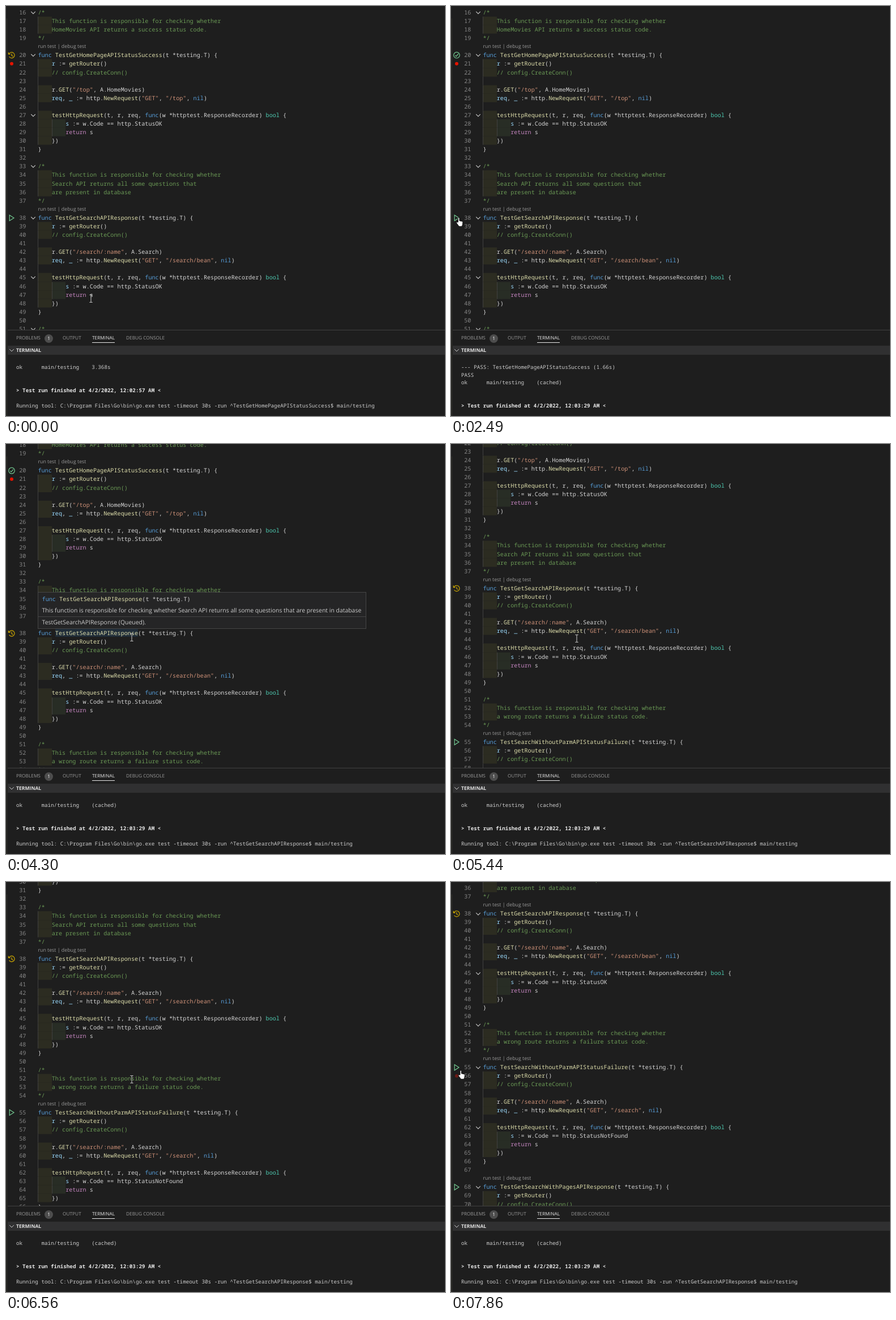
Animation of 775x723 px, one loop 8 s. Source, as an HTML page:

```html
<!DOCTYPE html>
<html lang="en">
<head>
<meta charset="utf-8">
<title>Running Go tests</title>
<style>
  html, body { margin: 0; width: 100%; height: 100%; overflow: hidden; background: #1e1e1e; }
  body { position: relative; color: #d4d4d4; white-space: pre; text-rendering: geometricPrecision;
    font: 8.3px "Open Sans", "Noto Sans", sans-serif; }
  i { font-style: normal; }
  svg { position: absolute; width: 16px; height: 16px; overflow: visible; fill: none; }
  .abs, #editor, #panel, #tip, #strip { position: absolute; }
  #editor { left: 0; top: 0; width: 775px; height: 571px; overflow: hidden; }
  #strip { width: 3px; height: 723px; background: #252522; }
  .code, .row { font: 10.165px/15.08px "Noto Sans Mono", "DejaVu Sans Mono", monospace; }
  .row { position: relative; height: 15.08px; }
  .row > * { position: absolute; top: 0; }
  .num { left: 23.2px; color: #858585; }
  .text { left: 56.4px; }
  .lens { left: 56.4px; color: #999; font: 8.8px/15.08px "Open Sans", "Noto Sans", sans-serif; }
  .indent { width: 24.4px; height: 15.2px; box-sizing: border-box; border-left: 1px solid #404040; }
  .mark { left: 2px; top: -.3px; stroke-width: 1.2; }
  .fold { left: 39.5px; top: 0; stroke: #c5c5c5; stroke-width: 1.1; }
  .dot { left: 6.8px; top: 4.3px; width: 6.6px; height: 6.6px; border-radius: 50%; background: #e51400; }
  .hint { background: #6b1a14; }
  .str { color: #ce9178; } .com { color: #6a9955; } .key { color: #569cd6; } .ret { color: #c586c0; }
  .type { color: #4ec9b0; } .fn { color: #dcdcaa; } .var { color: #9cdcfe; }
  #tip { left: 56px; top: 261px; width: 580px; height: 65px; box-sizing: border-box; background: #252526;
    border: 1px solid #454545; color: #ccc; font-size: 10.44px; line-height: 20px; }
  #tip div { padding-left: 6.6px; }
  #tip .code { line-height: 22px; }
  #tip div:last-child { border-top: 1px solid #454545; }
  #panel { left: 3px; top: 571px; width: 772px; height: 152px; background: #1e1e1e; border-top: 1px solid #414141; box-sizing: border-box; }
  .tab { top: 578px; line-height: 16px; color: #999; }
  .tab.on { color: #e7e7e7; border-bottom: 1px solid #e7e7e7; line-height: 15px; }
  #badge { left: 68px; top: 578.5px; width: 15px; height: 15px; border-radius: 50%; background: #4d4d4d;
    color: #fff; text-align: center; line-height: 15px; }
  #head { left: 3px; top: 599px; width: 772px; height: 16px; background: #303031; }
  #term { left: 18px; top: 630px; color: #ccc; font: 9.26px/13.5px "Noto Sans Mono", "DejaVu Sans Mono", monospace; }
  #term b { color: #e5e5e5; }
  #mouse { left: -8px; top: -8px; }
</style>
</head>
<body>
<div id="editor"><div id="doc"></div></div>
<div id="strip"></div>
<div id="tip"><div class="code" id="signature"></div><div>This function is responsible for checking whether Search API returns all some questions that are present in database</div><div>TestGetSearchAPIResponse (Queued).</div></div>
<div id="panel"></div>
<span class="abs tab" style="left:18px">PROBLEMS</span><span class="abs" id="badge">1</span>
<span class="abs tab" style="left:100px">OUTPUT</span>
<span class="abs tab on" style="left:152px">TERMINAL</span>
<span class="abs tab" style="left:212px">DEBUG CONSOLE</span>
<div class="abs" id="head"></div>
<svg style="left:2px;top:599px" viewBox="-8 -8 16 16"><path d="M-3.8-1.8 0 2 3.8-1.8" stroke="#ccc"/></svg>
<b class="abs" style="left:18px;top:599px;font-size:8.6px;line-height:16px;color:#e0e0e0">TERMINAL</b>
<div class="abs" id="term"></div>
<svg id="mouse" viewBox="-8 -8 16 16"></svg>
<script>
const $ = id => document.getElementById(id);

const MARKS = {
  play: '<path stroke="#73c991" d="M-3.8-5 4 0-3.8 5z"/>',
  pass: '<g stroke="#73c991"><circle r="5.3"/><path d="M-2.7.3-.8 2.2 2.8-2.2"/></g>',
  queued: '<path stroke="#cca700" d="M-4.6-2.2A5.1 5.1 0 1 1-4.4 2.6M-5.6-5V-1.8H-2.4M0-2.8V.6L2.4 2"/>'
};
const POINTERS = {
  beam: '<path stroke="#000" stroke-opacity=".5" stroke-width="2" d="M0-6V6"/><path stroke="#ddd" d="M-2.5-6.5H-.5L0-6 .5-6.5H2.5M0-6V6M-2.5 6.5H-.5L0 6 .5 6.5H2.5"/>',
  hand: '<path transform="translate(-6.5 -8.8)" fill="#fff" stroke="#000" stroke-width=".8" d="M4 9V2.2a1.2 1.2 0 0 1 2.4 0V6.5l4.6 1q1.5.4 1.4 2.2l-.6 4q-.3 2.8-2.6 2.8H6.8q-1.2 0-2-1.2L1.2 10.4q-.4-1.6 1-1.6z"/>'
};

// Document
const comment = (...lines) => ['/*', ...lines.map(l => '    ' + l), '*/'];
const test = (name, route, handler, path, status) => [
  'run test | debug test',
  `func ${name}(t *testing.T) {`,
  '    r := getRouter()',
  '    // config.CreateConn()',
  '',
  `    r.GET("${route}", A.${handler})`,
  `    req, _ := http.NewRequest("GET", "${path}", nil)`,
  '',
  '    testHttpRequest(t, r, req, func(w *httptest.ResponseRecorder) bool {',
  `        s := w.Code == http.${status}`,
  '        return s',
  '    })',
  '}',
  ''
];
const checking = 'This function is responsible for checking whether';
const source = [
  ...comment(checking, 'HomeMovies API returns a success status code.'),
  ...test('TestGetHomePageAPIStatusSuccess', '/top', 'HomeMovies', '/top', 'StatusOK'),
  ...comment(checking, 'Search API returns all some questions that', 'are present in database'),
  ...test('TestGetSearchAPIResponse', '/search/:name', 'Search', '/search/bean', 'StatusOK'),
  ...comment(checking, 'a wrong route returns a failure status code.'),
  ...test('TestSearchWithoutParmAPIStatusFailure', '/search/:name', 'Search', '/search', 'StatusNotFound'),
  ...test('TestGetSearchWithPagesAPIResponse', '/search/:name', 'Search', '/search/bean', 'StatusOK')
];

const CLASSES = ['str', 'com', 'key', 'ret', 'type', 'fn', 'var'];
const TOKEN = /("[^"]*")|(\/\/.*)|\b(func|nil)\b|\b(return)\b|\b(bool)\b|(\w+)(?=\()|(\w+)(?=(?:, \w+)? :=)/g;
const wrap = (cls, text) => `<i class="${cls}">${text}</i>`;
const paint = line => line.replace(TOKEN, (m, ...groups) => wrap(CLASSES[groups.findIndex(Boolean)], m));
const foldIcon = '<svg class="fold" viewBox="-8 -8 16 16"><path d="M-3.8-1.8 0 2 3.8-1.8"/></svg>';

function buildDocument() {
  let number = 16, inComment = false, inFunc = false;
  $('doc').innerHTML = source.map(line => {
    if (line.startsWith('run test')) return `<div class="row"><span class="lens">${line}</span></div>`;
    if (line === '/*') inComment = true;
    if (line === '}') inFunc = false;
    const depth = line ? line.search(/\S/) / 4 : +inFunc;
    let html = wrap('num', number);
    for (let d = 0; d < depth; d++) {
      const fill = !line ? 'none' : d ? '#282d25' : '#2c2c21';
      html += `<i class="indent" style="left:${56.4 + d * 24.4}px;background:${fill}"></i>`;
    }
    if (/^\/\*|\{$/.test(line)) html += foldIcon;
    if (line.startsWith('func')) {
      html += `<svg class="mark" viewBox="-8 -8 16 16">${MARKS.play}</svg>`;
      inFunc = true;
    }
    if (number === 21) html += '<i class="dot"></i>';
    if (number === 56) html += '<i class="dot hint" id="hint"></i>';
    html += `<span class="text">${inComment ? wrap('com', line) : paint(line)}</span>`;
    if (line === '*/') inComment = false;
    return `<div class="row" id="line${number++}">${html}</div>`;
  }).join('');
}

// Terminal
const finished = time => `<b>&gt; Test run finished at 4/2/2022, ${time} AM &lt;</b>`;
const running = name => `Running tool: C:\\Program Files\\Go\\bin\\go.exe test -timeout 30s -run ^${name}$ main/testing`;
const ok = result => `ok      main/testing    ${result}`;
const OUTPUT = [
  [ok('3.368s'), '', '', finished('12:02:57'), '', running('TestGetHomePageAPIStatusSuccess')],
  ['--- PASS: TestGetHomePageAPIStatusSuccess (1.66s)', 'PASS', ok('(cached)'), '', '', finished('12:03:29')],
  [ok('(cached)'), '', '', finished('12:03:29'), '', running('TestGetSearchAPIResponse')]
].map(lines => lines.join('\n'));

// Timeline, in ms
const LOOP = 8000, TICK = 130, NOTCH = 39.7;
const PASSED = 1150, QUEUED = 3150;
const SCROLLS = [3890, 4600, 5440, 5870, 6140, 6410, 6680, 6930];
const POINTER = [[20, 150, 516], [720, 386, 611], [890, 386, 611], [1530, 75, 381], [1920, 15, 381],
  [2900, 15, 381], [3740, 222, 341], [4600, 222, 341], [5440, 222, 343], [6560, 222, 348],
  [6800, 222, 348], [7330, 18.5, 340]];
const FOLDS = [[20, 1], [650, 0], [1940, 0], [2490, 1], [3000, 1], [3600, 0], [7250, 0], [7800, 1]];

function at(keys, t) {
  const next = keys.findIndex(k => k[0] > t);
  if (next < 1) return keys.at(next).slice(1);
  const [a, b] = [keys[next - 1], keys[next]];
  const steps = Math.max(1, Math.round((b[0] - a[0]) / TICK));
  const p = Math.floor((t - a[0]) / (b[0] - a[0]) * steps) / steps;
  return a.slice(1).map((v, i) => v + (b[i + 1] - v) * p);
}

buildDocument();
$('signature').innerHTML = paint('func TestGetSearchAPIResponse(t *testing.T)');
const mark = line => $('line' + line).querySelector('.mark');
const [homeMark, searchMark] = [mark(20), mark(38)];
const searchName = $('line38').querySelector('.fn');
const folds = document.querySelectorAll('.fold');

function setHtml(el, html) {
  if (el.shown !== html) el.innerHTML = el.shown = html;
}

function render(t) {
  const scroll = SCROLLS.filter(s => t >= s).length * NOTCH;
  $('doc').style.transform = `translateY(${3.7 - scroll}px)`;

  const [foldAlpha] = at(FOLDS, t);
  folds.forEach(f => f.style.opacity = foldAlpha);
  setHtml(homeMark, t < PASSED ? MARKS.queued : MARKS.pass);
  setHtml(searchMark, t < QUEUED ? MARKS.play : MARKS.queued);
  setHtml($('term'), OUTPUT[(t >= PASSED) + (t >= QUEUED)]);

  const hovering = t >= 4160 && t < 4600;
  $('tip').style.opacity = hovering ? (t < 4300 ? .6 : 1) : 0;
  searchName.style.background = hovering ? 'rgba(38,79,120,.3)' : '';
  $('hint').style.opacity = +(t >= 7330);

  const [x, y] = at(POINTER, t);
  setHtml($('mouse'), x < 45 || y > 571 ? POINTERS.hand : POINTERS.beam);
  $('mouse').style.transform = `translate(${x}px, ${y}px)`;
}

const start = performance.now();
function frame() {
  render((performance.now() - start) % LOOP);
  requestAnimationFrame(frame);
}
frame();
</script>
</body>
</html>
```
